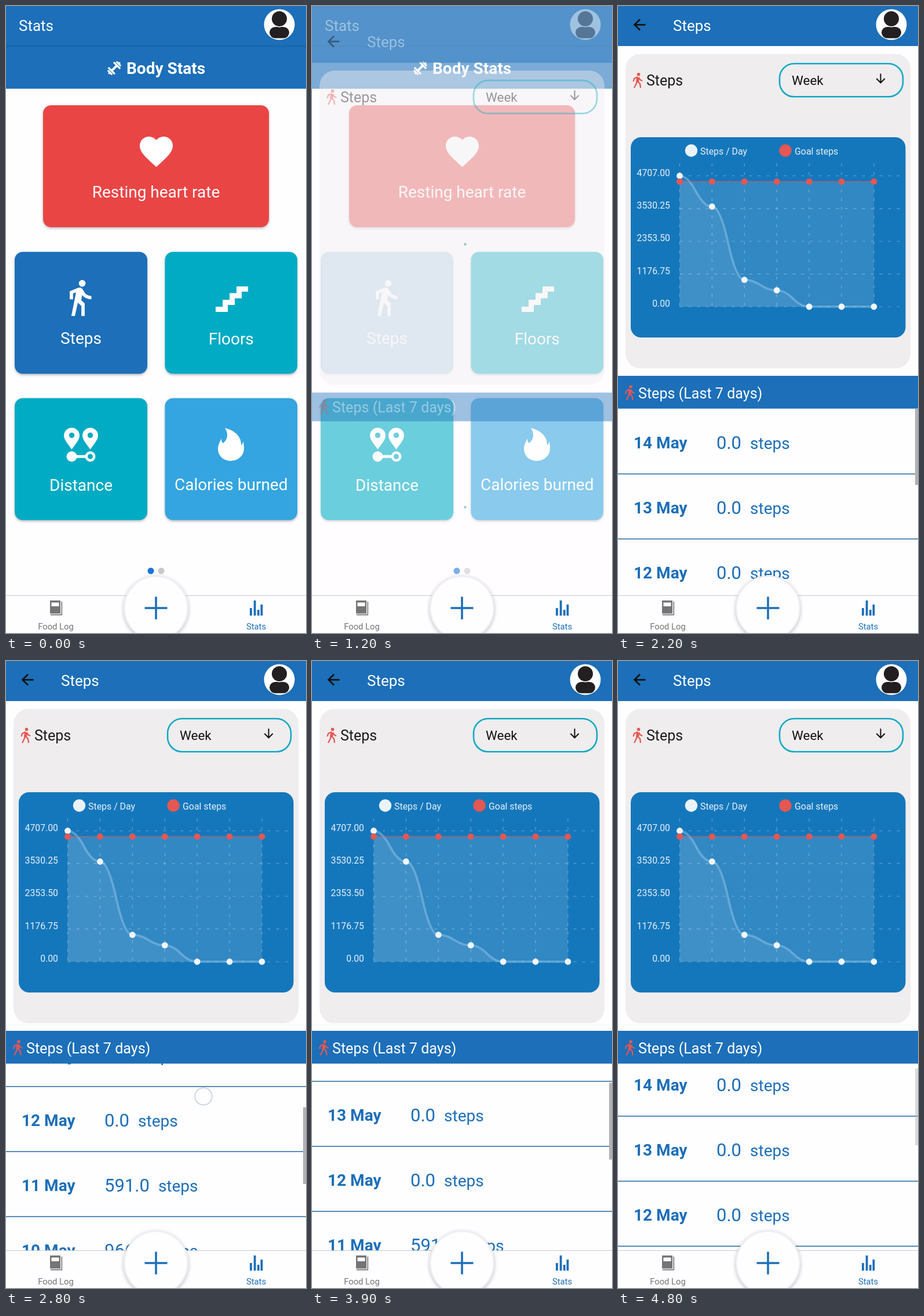
These frames come from a looping animation (518 by 1080 pixels, 4.9 s). An HTML page:

```html
<!DOCTYPE html>
<html lang="en">
<head>
<meta charset="utf-8">
<title>Step stats</title>
<style>
html, body { margin: 0; width: 100%; height: 100%; overflow: hidden; background: #fefdff; }
svg { display: block; width: 518px; height: 1080px; font-family: Roboto, sans-serif; }
.card { filter: drop-shadow(0 2px 2px rgba(0, 0, 0, .28)); }
</style>
</head>
<body>
<svg id="stage" viewBox="0 0 518 1080"></svg>
<script>
const LOOP = 4900, STEP = 100, DATA_AT = 2000;
const BLUE = '#1c6fb8', TEAL = '#00abc3', RED = '#e55752', PAPER = '#fefdff';

const text = (x, y, size, str, attrs = '') =>
  `<text x="${x}" y="${y}" font-size="${size}" ${attrs}>${str}</text>`;
const rect = (x, y, w, h, fill, attrs = '') =>
  `<rect x="${x}" y="${y}" width="${w}" height="${h}" fill="${fill}" ${attrs}/>`;
const dot = (x, y, r, fill, attrs = '') =>
  `<circle cx="${x}" cy="${y}" r="${r}" fill="${fill}" ${attrs}/>`;
const line = (d, color, width, attrs = '') =>
  `<path d="${d}" fill="none" stroke="${color}" stroke-width="${width}" ${attrs}/>`;
const shape = (d, attrs = '') => `<path d="${d}" ${attrs}/>`;
const group = (body, attrs = '') => `<g ${attrs}>${body}</g>`;

const avatar = dot(472, 32, 26.5, '#fff')
  + rect(455, 36, 34, 19.5, '#231f20', 'rx="10"')
  + dot(472, 22, 13.8, '#231f20', 'stroke="#fff" stroke-width="1.5"');

const heart = shape('M12 21.35l-1.45-1.32C5.4 15.36 2 12.28 2 8.5 2 5.42 4.42 3 7.5 3c1.74 0 3.41.81 4.5 2.09C13.09 3.81 14.76 3 16.5 3 19.58 3 22 5.42 22 8.5c0 3.78-3.4 6.86-8.55 11.54z',
  'transform="translate(225.3 216.4) scale(2.85)"');
const walker = shape('M13.5 5.5c1.1 0 2-.9 2-2s-.9-2-2-2-2 .9-2 2 .9 2 2 2zM9.8 8.9L7 23h2.1l1.8-8 2.1 2v6h2v-7.5l-2.1-2 .6-3C14.8 12 16.8 13 19 13v-2c-1.9 0-3.5-1-4.3-2.4l-1-1.6c-.4-.6-1-1-1.7-1-.3 0-.5.1-.8.1L6 8.3V13h2V9.6z',
  'transform="translate(92.7 467.7) scale(2.88)"');
const stairs = line('M362 522.5H378.5V510.5H390.5V499H402.5V487.5H418', '#fff', 9);
const pin = x => shape(`M${x} 764C${x - 4} 757 ${x - 13.5} 748 ${x - 13.5} 740a13.5 13.5 0 0 1 27 0C${x + 13.5} 748 ${x + 4} 757 ${x} 764z`)
  + dot(x, 739.5, 4.7, TEAL);
const route = pin(113.5) + pin(145.5) + line('M113 776H139', '#fff', 5)
  + dot(113.5, 776, 9, '#fff') + dot(145.5, 776, 6.7, 'none', 'stroke="#fff" stroke-width="4.5"');
const flame = shape('M378 727C396 731 407 743 406 757C409 754 409.5 751 409.5 749C412 762 411 768 408 773C403 780 396 783.5 388 783.5C375 783.5 366 774 366 763C366 756 369 751 372 745C372 750 373 752 375 753C382 747 385 738 378 727z');
const dumbbell = group(
  rect(-7, -2, 14, 4, '#fff')
  + [-1, 1].map(s => rect(s * 6.5 - 1.6, -8, 3.2, 16, '#fff', 'rx="1"')
    + rect(s * 10.6 - 1.5, -5.5, 3, 11, '#fff', 'rx="1"')).join('')
  + line('M-14 0H-11M11 0H14', '#fff', 3), 'transform="translate(187 107) rotate(-45)"');
const redWalker = (x, y) => group(
  dot(10.5, 2.8, 2.8, RED)
  + line('M9.5 8L8.5 16', RED, 5)
  + line('M9 7L3 10L1.5 15M11 8L13 12L17 14M9 15L13 19L14 26M8 15L6 20L3 26', RED, 2.3, 'stroke-linejoin="round"'),
  `transform="translate(${x} ${y})"`);

const card = (x, y, w, fill, icon, label, base, attrs = '') =>
  group(rect(x, y, w, 210, fill, 'rx="14" class="card"') + icon
    + text(x + w / 2, base, 28, label, 'text-anchor="middle"'), `fill="#fff" ${attrs}`);

const home = rect(0, 0, 518, 1080, PAPER)
  + rect(0, 0, 518, 142.5, BLUE) + rect(0, 68.5, 518, 1.6, '#18609f')
  + text(22, 42.5, 26, 'Stats', 'fill="#fff"') + avatar + dumbbell
  + text(208, 117, 28, 'Body Stats', 'fill="#fff" font-weight="700"')
  + card(64, 171, 390, '#ea4545', heart, 'Resting heart rate', 330)
  + card(15, 423.5, 229, BLUE, walker, 'Steps', 582, 'id="press"')
  + card(274.5, 423.5, 228.5, TEAL, stairs, 'Floors', 583)
  + card(15, 675.5, 229, TEAL, route, 'Distance', 835)
  + card(274.5, 675.5, 228.5, '#34a5e0', flame, 'Calories burned', 834)
  + dot(250, 973, 5.5, '#1976d6') + dot(268, 973, 5.5, '#c9c9cb');

const days = [4707, 3601, 966, 591, 0, 0, 0];
const colX = i => 106.5 + 55.9 * i;
const valY = v => 518 - v * 225.5 / 4707;

function curve() {
  let d = `M${colX(0)} ${valY(days[0])}`;
  for (let i = 0; i < 6; i++) {
    const x0 = colX(i), x1 = colX(i + 1), y0 = valY(days[i]), y1 = valY(days[i + 1]);
    const mx = (x0 + x1) / 2;
    d += `Q${(x0 + mx) / 2} ${y0} ${mx} ${(y0 + y1) / 2}Q${(mx + x1) / 2} ${y1} ${x1} ${y1}`;
  }
  return d;
}

function chart() {
  const goalY = valY(4500), left = colX(0), right = colX(6), d = curve();
  let s = rect(22, 226, 474.5, 345, '#1577bb', 'rx="18"');
  for (let i = 0; i < 5; i++) {
    const y = valY(4707 * (4 - i) / 4);
    s += line(`M${left} ${y}H490`, '#fff', 1.2, 'stroke-dasharray="5 10" opacity=".32"')
      + text(90, y, 15.8, (4707 * (4 - i) / 4).toFixed(2), 'fill="#e8f1f8" text-anchor="end"');
  }
  days.forEach((_, i) => s += line(`M${colX(i)} 271V518`, '#fff', 1.2, 'stroke-dasharray="5 10" opacity=".32"'));
  s += shape(`${d}V518H${left}z`, 'fill="#fff" opacity=".07"')
    + rect(left, goalY, right - left, 518 - goalY, '#fff', 'opacity=".12"')
    + line(d, '#a9d2f0', 3.8, 'opacity=".4"')
    + line(`M${left} ${goalY}H${right}`, RED, 3, 'opacity=".35"');
  days.forEach((v, i) => s += dot(colX(i), valY(v), 5.4, '#f0f7fc'));
  days.forEach((v, i) => s += dot(colX(i), goalY, 5.4, RED));
  return s + dot(126.5, 249, 10.7, '#eaf3fa') + text(142, 255.5, 15.9, 'Steps / Day', 'fill="#e8f1f8"')
    + dot(289, 249, 10.7, RED) + text(305, 255.5, 15.9, 'Goal steps', 'fill="#e8f1f8"');
}

// Newest day first; y = 0 is the centre of the first row.
const rows = [...days].reverse().map((v, i) => {
  const y = 112 * i;
  return text(27, y + 10, 28, `${14 - i} May`, 'font-weight="700"')
    + text(170, y + 10.5, 31, `${v.toFixed(1)}<tspan dx="15" font-size="28">steps</tspan>`)
    + line(`M0 ${y + 54}H518`, '#22699f', 1.6);
}).join('');

// Every part fades on its own, so overlapping parts add up.
const part = body => group(body, 'class="part"');
const spinner = line('', '#128579', 4, 'class="spin"');
const detail = part(rect(0, -120, 518, 1200, PAPER))
  + part(rect(0, -120, 518, 189, BLUE))
  + part(line('M47.5 32.3H29M38 23L28.5 32.3L38 41.6', '#111', 2.7))
  + part(text(95, 42.5, 26, 'Steps', 'fill="#fff"'))
  + group(avatar, 'id="avatar"')
  + part(rect(13, 82.5, 492, 541.5, '#efedee', 'rx="26"'))
  + part(redWalker(25, 115))
  + part(text(49, 137, 25, 'Steps', 'fill="#1b1b1b"'))
  + part(rect(279, 99.3, 213, 57, 'none', `rx="25" stroke="#0fa9c4" stroke-width="2.6"`))
  + part(text(300, 136, 22.4, 'Week', 'fill="#111"'))
  + part(line('M453.5 116.5V132M446.3 125L453.5 132.3L460.7 125', '#111', 2))
  + part(rect(0, 637, 518, 49.5, BLUE, 'id="band"'))
  + group(part(redWalker(11.5, 649)) + part(text(35, 671.5, 25.1, 'Steps (Last 7 days)', 'fill="#fff"')), 'id="bandText"')
  + group(part(group(spinner, 'transform="translate(260 399)"'))
    + part(group(spinner, 'transform="translate(260 852)"')), 'id="loading"')
  + group(chart()
    + group(group(rows, `id="rows" fill="${BLUE}"`), 'clip-path="url(#list)"')
    + rect(513, 693, 5, 132, '#b1b1b3', 'id="thumb"'), 'id="data"');

const nav = rect(0, 1015, 518, 65, PAPER) + rect(0, 1015, 518, 1, '#c9c9cb')
  + dot(259, 1037, 54.5, '#fff', 'stroke="#efeef1" stroke-width="3" style="filter:drop-shadow(0 2px 3px rgba(0,0,0,.25))"')
  + dot(259, 1037, 53.5, PAPER)
  + line('M239.5 1037H278.5M259 1017.5V1056.5', BLUE, 3.6)
  + rect(76, 1024, 18, 22.5, '#757575') + rect(78.5, 1027.5, 13, 6.5, PAPER)
  + line('M96.3 1026V1048.6H77', '#757575', 1.6)
  + [[421, 1037], [427.7, 1024], [433.8, 1040], [439.5, 1031]]
    .map(([x, y]) => rect(x, y, 3.8, 1050 - y, BLUE)).join('')
  + text(86, 1074, 14.8, 'Food Log', 'fill="#757575" text-anchor="middle"')
  + text(432, 1074, 14.8, 'Stats', `fill="${BLUE}" text-anchor="middle"`);

const $ = id => document.getElementById(id);
$('stage').innerHTML = '<clipPath id="list"><rect y="693" width="518" height="322"/></clipPath>'
  + home + group(detail, 'id="detail"')
  + dot(0, 0, 14.7, '#fff', 'id="touch" fill-opacity=".6" stroke="#cbd6e0" stroke-width="2"') + nav;
const parts = document.querySelectorAll('.part'), spins = document.querySelectorAll('.spin');

const clamp = v => Math.max(0, Math.min(1, v));
const show = (id, on) => $(id).setAttribute('display', on ? 'inline' : 'none');
const set = (id, name, value) => $(id).setAttribute(name, value);

function track(keys, t) {
  if (t <= keys[0][0]) return keys[0][1];
  for (let i = 1; i < keys.length; i++) {
    const [t0, v0] = keys[i - 1], [t1, v1] = keys[i];
    if (t <= t1) return v0 + (v1 - v0) * (t - t0) / (t1 - t0);
  }
  return keys[keys.length - 1][1];
}

// cubic-bezier(.4, 0, .2, 1)
function ease(p) {
  let lo = 0, hi = 1;
  for (let i = 0; i < 20; i++) {
    const u = (lo + hi) / 2, v = 1 - u;
    if (1.2 * v * v * u + .6 * v * u * u + u ** 3 < p) lo = u; else hi = u;
  }
  return 3 * (1 - lo) * lo * lo + lo ** 3;
}

function arc(t) {
  const phase = Math.max(0, t - 1115) % 1333 / 667;
  const tail = 270 * ease(clamp(phase - 1)), head = 270 * ease(clamp(phase));
  const from = -82 + .235 * (t - 1200) + tail;
  const at = deg => `${18 * Math.cos(deg * Math.PI / 180)} ${18 * Math.sin(deg * Math.PI / 180)}`;
  const sweep = Math.max(8, head - tail);
  return `M${at(from)}A18 18 0 ${sweep > 180 ? 1 : 0} 1 ${at(from + sweep)}`;
}

const SCROLL = [[2480, 0], [2600, 50], [2700, 112], [2800, 185], [2900, 285], [3000, 370], [3150, 440],
  [3300, 466], [3400, 466], [3500, 427], [3600, 345], [3700, 230], [3800, 140], [3900, 82],
  [4000, 54], [4100, 37], [4200, 27], [4350, 22]];
const PRESS = [[1000, 1], [1130, .2], [1200, .32], [1400, 1]];

function draw(t) {
  const age = t - 1130, alpha = clamp(age / 167), loaded = t >= DATA_AT;
  set('press', 'opacity', track(PRESS, t));
  show('detail', age > 0);
  set('detail', 'transform', `translate(0 ${88 * (1 - clamp(age / 350)) ** 5})`);
  parts.forEach(p => p.setAttribute('opacity', alpha));
  show('avatar', alpha === 1);

  show('loading', !loaded);
  show('data', loaded);
  spins.forEach(s => s.setAttribute('d', arc(t)));
  set('band', 'height', loaded ? 56.5 : 49.5);
  set('bandText', 'transform', `translate(0 ${loaded ? 4 : 0})`);

  const y = track(SCROLL, t);
  set('rows', 'transform', `translate(0 ${752 - y})`);
  set('thumb', 'y', 693 + y * .41);
  set('thumb', 'opacity', 1 - clamp((t - 4670) / 250));

  const up = t > 2450 && t < 2850, down = t > 3380 && t < 3620;
  show('touch', up || down);
  set('touch', 'cx', up ? 341 : 371);
  set('touch', 'cy', up ? 935 - y : 1230 - y);
}

function tick() {
  draw(Math.floor((performance.now() + 15) % LOOP / STEP) * STEP);
  requestAnimationFrame(tick);
}
tick();
</script>
</body>
</html>
```
